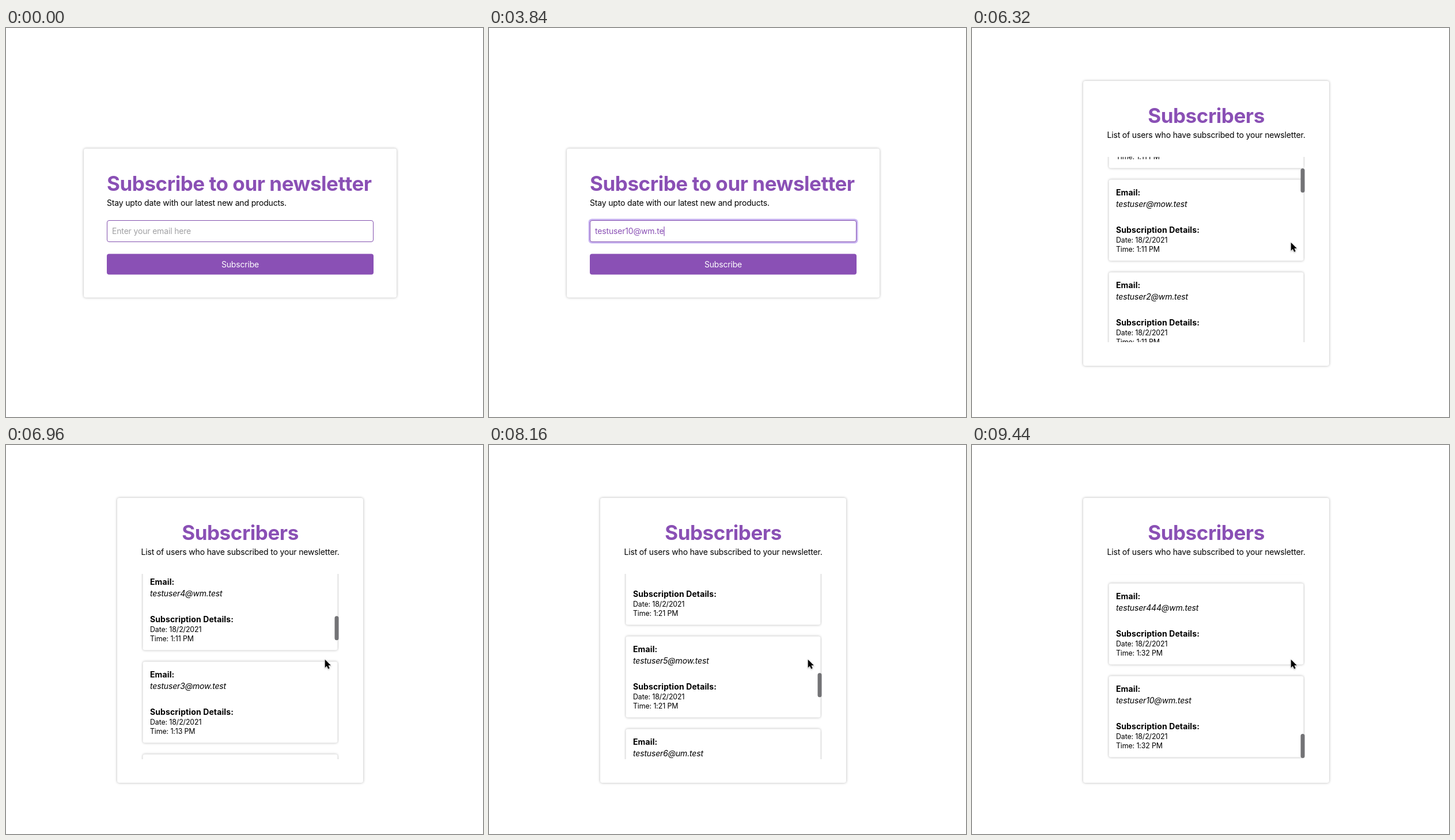
Animation of 828 by 676 pixels, one loop 9840 ms. Source, as an HTML page:

```html
<!DOCTYPE html>
<html lang="en">
<head>
<meta charset="utf-8">
<title>Newsletter form</title>
<style>
  html, body { margin: 0; width: 100%; height: 100%; overflow: hidden; background: #fff; }
  svg { display: block; width: 828px; height: 676px; }
  text { font: 400 14px Inter, "Liberation Sans", sans-serif; font-optical-sizing: none; letter-spacing: -.012em; white-space: pre; }
  .title { font-weight: 700; font-size: 35px; letter-spacing: -.013em; fill: #8a50b5; }
  .mid { text-anchor: middle; }
  .label { fill: #fff; text-anchor: middle; }
  .bold { font-weight: 700; letter-spacing: .008em; }
  .mail { font-style: italic; }
  .small { font-size: 12.4px; letter-spacing: -.01em; }
  .hint { fill: #a0a0a3; }
  .typed { fill: #8a50b5; }
  .card { fill: #fff; filter: drop-shadow(0 0 2.2px rgba(0, 0, 0, .3)); }
  .button { fill: #8a50b5; }
</style>
</head>
<body>
<script>
const LOOP = 9840, STEP = 80;
const FIRST_TOP = 227, PITCH = 161;

const make = (tag, attrs, parent, text) => {
  const el = document.createElementNS("http://www.w3.org/2000/svg", tag);
  for (const key in attrs) el.setAttribute(key, attrs[key]);
  if (text) el.textContent = text;
  parent.append(el);
  return el;
};
const label = (parent, cls, x, y, text) => make("text", { class: cls, x, y }, parent, text);
const box = (parent, cls, x, y, width, height, rx = 4) =>
  make("rect", { class: cls, x, y, width, height, rx }, parent);
const show = (el, on) => { el.style.display = on ? "" : "none"; };

const svg = make("svg", { viewBox: "0 0 828 676" }, document.body);
const form = make("g", {}, svg);
const thanks = make("g", {}, svg);
const list = make("g", {}, svg);

// Form
box(form, "card", 135, 209.5, 543, 259);
label(form, "title", 175, 283, "Subscribe to our newsletter");
label(form, "", 175, 309, "Stay upto date with our latest new and products.");
const ring = make("rect", { x: 172.5, y: 331.5, width: 468, height: 43, rx: 6, fill: "#cab6f2" }, form);
make("rect", { x: 175.5, y: 334.5, width: 462, height: 37, rx: 3.5, fill: "#fff", stroke: "#8350ae" }, form);
const hint = label(form, "hint", 184, 358, "Enter your email here");
const typed = label(form, "typed", 184, 358, "");
const caret = make("rect", { y: 345, width: 1.2, height: 16.5, fill: "#8a50b5" }, form);
const submit = box(form, "button", 175, 392.5, 463, 36);
label(form, "label", 406.5, 415.5, "Subscribe");

// Confirmation
box(thanks, "card", 143, 238.5, 527, 201);
label(thanks, "title", 183, 312, "Thank you for subscribing!");
label(thanks, "", 183, 338, "You have been successfully subscribed to our newsletter.");
box(thanks, "button", 183, 363.5, 447, 36);
label(thanks, "label", 406.5, 386.5, "View all subscribers");

// Subscriber list
box(list, "card", 193, 92, 427, 495);
label(list, "title mid", 406.5, 165, "Subscribers");
label(list, "mid", 406.5, 191, "List of users who have subscribed to your newsletter.");
const clip = make("clipPath", { id: "view" }, make("defs", {}, svg));
make("rect", { x: 235, y: 224, width: 343, height: 322 }, clip);
const view = make("g", { "clip-path": "url(#view)" }, list);
const rows = make("g", {}, view);
const people = [
  ["1@wm.test", 11], ["@mow.test", 11], ["2@wm.test", 11], ["4@wm.test", 11],
  ["3@mow.test", 13], ["4@mow.test", 15], ["5@wm.test", 18], ["6@mow.test", 21],
  ["5@mow.test", 21], ["6@um.test", 21], ["7@wm.test", 24], ["8@wm.test", 28],
  ["444@wm.test", 32], ["10@wm.test", 32]
];
people.forEach(([mail, minute], i) => {
  const row = make("g", { transform: `translate(250 ${FIRST_TOP + i * PITCH})` }, rows);
  box(row, "card", -12.5, .5, 338, 141);
  label(row, "bold", 0, 28, "Email:");
  label(row, "mail", 0, 48, "testuser" + mail);
  label(row, "bold", 0, 92.5, "Subscription Details:");
  label(row, "small", 0, 109.5, "Date: 18/2/2021");
  label(row, "small", 0, 125.5, `Time: 1:${minute} PM`);
});
const thumb = make("rect", { x: 570.5, width: 7, height: 42, rx: 3.5, fill: "#737376" }, view);

// Pointers
const arrow = make("path", {
  d: "M0 0V14.2L3.2 11.3L5.5 16.4L8 15.3L5.8 10.4H10.2Z",
  stroke: "#fff", "stroke-width": 1.1, "paint-order": "stroke",
  style: "filter: drop-shadow(0 1px 1px rgba(0, 0, 0, .3))"
}, svg);
const beam = make("path", {
  d: "M-3 -8Q0 -8 0 -6V6Q0 8 -3 8M3 -8Q0 -8 0 -6V6Q0 8 3 8M-1.5 2H1.5",
  fill: "none", stroke: "#222"
}, svg);

// Motion tables: [time, values...]
const path = [
  [960, 442, 676], [1040, 430, 643], [1200, 392, 500], [1360, 358, 362], [1440, 354, 349],
  [4800, 354, 349], [4880, 359, 355], [5040, 378, 374], [5120, 382, 378],
  [5520, 382, 378], [5600, 428, 377], [5760, 538, 373], [5840, 553, 372]
];
const scroll = [[6080, 0], [6160, 24], [6320, 125], [6960, 495], [8160, 1183], [9360, 1890], [9440, 1919]];
const keys = [
  ...[..."testuser"].map((c, i) => [1760 + i * STEP, c]),
  [2720, "1"], [2880, "0"], [3200, "@"],
  [3440, "w"], [3520, "m"], [3600, "."], [3760, "t"], [3840, "e"], [3920, "s"], [4000, "t"]
];

function at(table, t) {
  const next = table.findIndex(row => row[0] > t);
  if (next < 0) return table[table.length - 1].slice(1);
  if (next === 0) return table[0].slice(1);
  const a = table[next - 1], b = table[next];
  const p = (t - a[0]) / (b[0] - a[0]);
  return a.slice(1).map((v, i) => v + (b[i + 1] - v) * p);
}

function draw(ms) {
  const t = Math.floor((ms % LOOP) / STEP) * STEP;
  show(form, t < 4480);
  show(thanks, t >= 4480 && t < 5280);
  show(list, t >= 5280);

  const focus = t >= 1520;
  const text = keys.filter(k => k[0] <= t).map(k => k[1]).join("");
  show(ring, focus);
  show(caret, focus);
  show(hint, !text);
  typed.textContent = text;
  if (t < 4480) caret.setAttribute("x", 184 + (text ? typed.getComputedTextLength() : 0));
  submit.style.opacity = t >= 4240 ? .85 : 1;

  const [top] = at(scroll, t);
  rows.setAttribute("transform", `translate(0 ${-Math.round(top)})`);
  thumb.setAttribute("y", 226 + top / 1919 * 276);
  show(thumb, t >= 6080);

  const [x, y] = at(path, t);
  const overInput = t < 4480 && y < 372;
  const seen = (t >= 1040 && t < 1760) || t >= 4800;
  show(arrow, seen && !overInput);
  show(beam, seen && overInput);
  arrow.setAttribute("transform", `translate(${x + .7} ${y + .7})`);
  beam.setAttribute("transform", `translate(${Math.round(x) + .5} ${Math.round(y)})`);
}

const start = performance.now();
function tick() {
  draw(performance.now() - start);
  requestAnimationFrame(tick);
}
tick();
</script>
</body>
</html>
```
